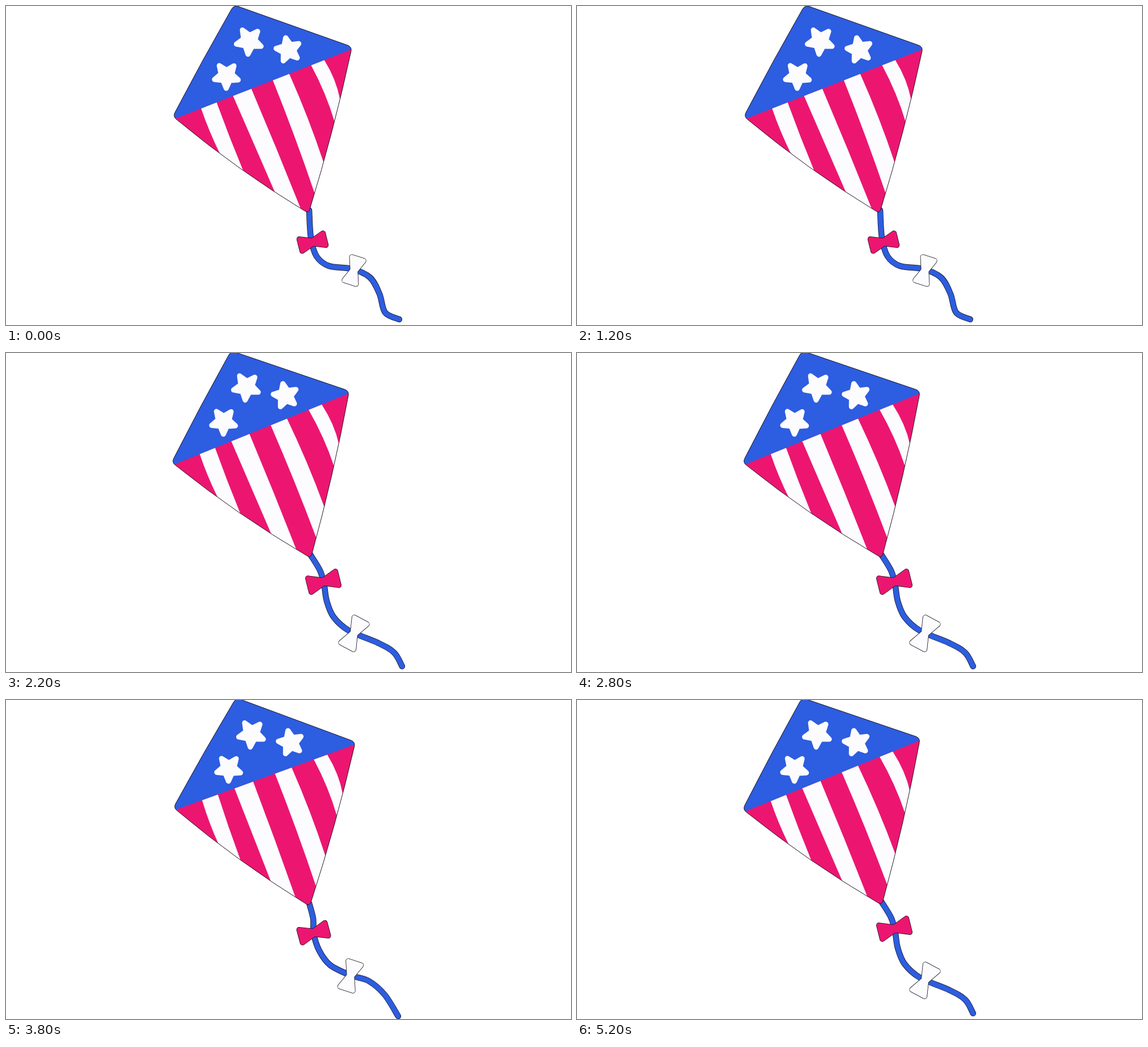
These frames come from a looping animation (997 px wide and 562 px high, 5.41 s). An HTML page with a canvas:

```html
<!DOCTYPE html>
<html>
<head>
<meta charset="utf-8">
<title>Kite</title>
<style>
html, body { margin: 0; width: 100%; height: 100%; overflow: hidden; background: #fff; }
canvas { display: block; }
</style>
</head>
<body>
<canvas id="stage" width="997" height="562"></canvas>
<script>
const ctx = document.getElementById('stage').getContext('2d');
const BLUE = '#2d5de0', PINK = '#ec1671', WHITE = '#fcfcff', INK = '#101018';
const LOOP = 5410, STEP = 200, LAST = 26;

// Corners run clockwise from the top; bows are x, y and angle in degrees.
const poses = [
  {
    corners: [[402, -2], [611, 72], [534, 366], [294, 195]], sag: 1.05, bowSize: 21.5,
    tail: [[535, 360], [538, 408], [548, 441], [570, 458], [610, 463], [642, 478], [659, 507], [669, 540], [694, 552]],
    bows: [[541, 416, -14], [614, 466, -72]]
  },
  {
    corners: [[406, -4], [617, 74], [536, 364], [295, 190]], sag: 1, bowSize: 23.5,
    tail: [[535, 358], [542, 385], [543, 412], [553, 442], [572, 467], [608, 485], [640, 495], [668, 519], [692, 557]],
    bows: [[543, 410, -15], [608, 486, -72]]
  },
  {
    corners: [[397, -4], [606, 67], [538, 362], [292, 193]], sag: 1, bowSize: 25,
    tail: [[537, 355], [554, 383], [561, 406], [566, 437], [578, 465], [605, 489], [657, 511], [685, 528], [699, 552]],
    bows: [[560, 403, -14], [614, 494, -62]]
  }
];

const BULGE = [0, 3, 5, 1];
// Stripe edges: start along the seam, end along the two lower sides (0-1 left, 1-2 right).
const TOPS = [0.152, 0.24, 0.333, 0.437, 0.559, 0.652, 0.776, 0.851];
const ENDS = [0.342, 0.505, 0.725, 0.9, 1.123, 1.31, 1.555, 1.687];
// Stars: offset from the top corner, radius, angle of one tip.
const STARS = [[27, 64, 23, 95], [96, 79, 21.5, 114], [-13, 125, 22, 91]];

const mix = (a, b, t) => [a[0] + (b[0] - a[0]) * t, a[1] + (b[1] - a[1]) * t];
const toward = (a, b, d) => mix(a, b, d / Math.hypot(b[0] - a[0], b[1] - a[1]));
const rad = deg => deg * Math.PI / 180;

// Control point that pushes the middle of a clockwise side outward.
function bulge(a, b, out) {
  const [x, y] = mix(a, b, 0.5), len = Math.hypot(b[0] - a[0], b[1] - a[1]);
  return [x + (b[1] - a[1]) / len * out * 2, y - (b[0] - a[0]) / len * out * 2];
}

function polygon(points) {
  const path = new Path2D();
  points.forEach(p => path.lineTo(...p));
  path.closePath();
  return path;
}

function stroke(path, color, width) {
  ctx.strokeStyle = color;
  ctx.lineWidth = width;
  ctx.stroke(path);
}

function fill(path, color) {
  ctx.fillStyle = color;
  ctx.fill(path);
}

function outline(corners) {
  const path = new Path2D(), r = 9;
  corners.forEach((a, i) => {
    const b = corners[(i + 1) % 4], c = corners[(i + 2) % 4];
    const start = toward(a, b, r), end = toward(b, a, r);
    path.lineTo(...start);
    path.quadraticCurveTo(...bulge(start, end, BULGE[i]), ...end);
    path.quadraticCurveTo(...b, ...toward(b, c, r));
  });
  path.closePath();
  return path;
}

// Smooth curve through all points.
function spline(points) {
  const path = new Path2D(), at = i => points[Math.max(0, Math.min(i, points.length - 1))];
  path.moveTo(...points[0]);
  for (let i = 0; i < points.length - 1; i++) {
    const [p, a, b, n] = [at(i - 1), at(i), at(i + 1), at(i + 2)];
    path.bezierCurveTo(a[0] + (b[0] - p[0]) / 6, a[1] + (b[1] - p[1]) / 6,
      b[0] - (n[0] - a[0]) / 6, b[1] - (n[1] - a[1]) / 6, ...b);
  }
  return path;
}

function stripes([, right, bottom, left], seam, sag) {
  const side = (a, b, t, out) => {
    const c = bulge(a, b, out);
    return mix(mix(a, c, t), mix(c, b, t), t);
  };
  const edge = i => {
    const t = ENDS[i], top = seam(TOPS[i]);
    const end = t < 1 ? side(left, bottom, t * sag, -BULGE[2]) : side(bottom, right, t - 1, -BULGE[1]);
    const [x, y] = mix(top, end, 0.5);
    return { top, end, bend: [x + (i - 2) * 1.5, y] };
  };
  for (let i = 0; i < TOPS.length; i += 2) {
    const a = edge(i), b = edge(i + 1), path = new Path2D();
    path.moveTo(...a.top);
    path.quadraticCurveTo(...a.bend, ...a.end);
    path.lineTo(...b.end);
    path.quadraticCurveTo(...b.bend, ...b.top);
    fill(path, WHITE);
  }
}

function star(x, y, r, turn) {
  const path = polygon(Array.from({ length: 10 }, (_, i) => {
    const a = rad(turn + i * 36), q = i % 2 ? r * 0.46 : r;
    return [x + q * Math.cos(a), y + q * Math.sin(a)];
  }));
  fill(path, WHITE);
  stroke(path, WHITE, 9);
}

function bow([x, y, angle], size, color) {
  const h = size / 2, w = 2.5;
  const path = polygon([[-size, -h], [0, -w], [size, -h], [size, h], [0, w], [-size, h]]);
  ctx.save();
  ctx.translate(x, y);
  ctx.rotate(rad(angle));
  stroke(path, INK, 9.6);
  stroke(path, color, 8);
  fill(path, color);
  ctx.restore();
}

function draw({ corners, sag, bowSize, tail, bows }) {
  const [top, right, , left] = corners;
  const kite = outline(corners), string = spline(tail);
  const seam = t => mix([left[0] + 3, left[1] + 4], [right[0] - 3, right[1] + 5], t);

  ctx.clearRect(0, 0, 997, 562);
  ctx.lineCap = ctx.lineJoin = 'round';
  stroke(string, INK, 10.5);
  stroke(string, BLUE, 9);
  bow(bows[0], bowSize, PINK);
  bow(bows[1], bowSize, WHITE);

  fill(kite, PINK);
  ctx.save();
  ctx.clip(kite);
  stripes(corners, seam, sag);
  fill(polygon([seam(-0.1), seam(1.1), [right[0], -20], [left[0], -20]]), BLUE);
  STARS.forEach(([x, y, r, turn]) => star(top[0] + x, top[1] + y, r, turn));
  ctx.restore();
  stroke(kite, INK, 0.9);
}

function tick() {
  const step = Math.min(Math.floor(performance.now() % LOOP / STEP), LAST);
  draw(poses[step % poses.length]);
  requestAnimationFrame(tick);
}
tick();
</script>
</body>
</html>
```
